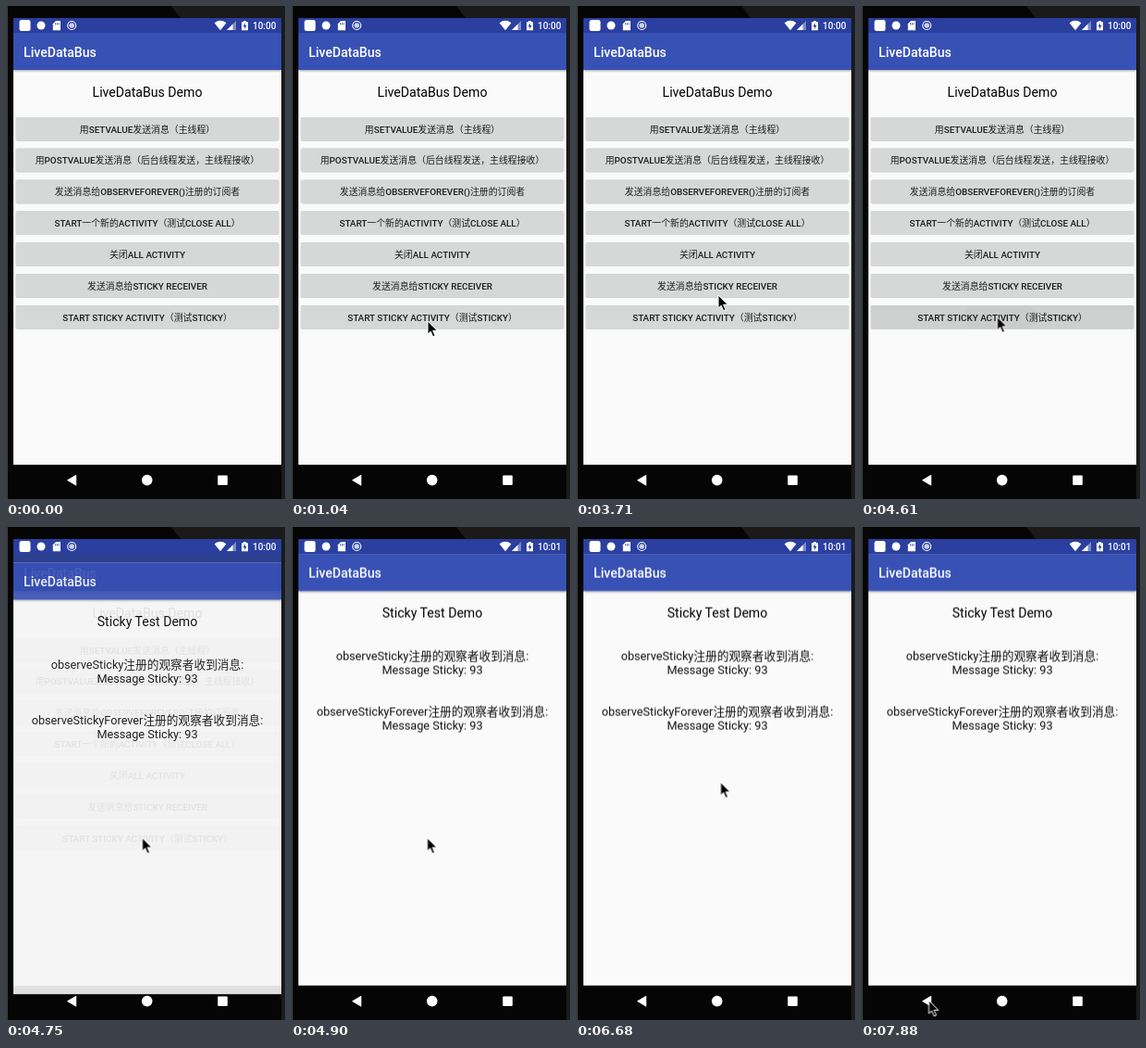
Recreate the animation shown at these times as an HTML page. Size 302 by 532 pixels, loop 8 s.

```html
<!DOCTYPE html>
<html lang="zh-CN">
<head>
<meta charset="utf-8">
<title>LiveDataBus Demo</title>
<style>
html, body { margin: 0; width: 100%; height: 100%; overflow: hidden; background: #050505; }
svg { display: block; width: 302px; height: 532px; }
text { font-family: Roboto, "Noto Sans CJK SC", "Noto Sans CJK", sans-serif; }
.mid { text-anchor: middle; }
.bar { fill: #3851b5; filter: drop-shadow(0 1px 1.2px rgba(0, 0, 0, .35)); }
.title { font-size: 14.1px; font-weight: 500; fill: #fff; }
.head { font-size: 14.1px; }
.msg { font-size: 12.7px; fill: #111; }
.btn rect { fill: #d6d7d7; filter: drop-shadow(0 .8px .7px rgba(0, 0, 0, .32)); }
.btn text { font-size: 9.88px; font-weight: 500; fill: #1c1c1c; }
.clock { font-size: 10px; font-weight: 500; fill: #fff; }

.loop { animation: 8s step-end infinite; }
#home { animation-name: home; }
#sticky { animation-name: sticky; }
#send { animation-name: send; }
#press { animation-name: press; }
#before { animation-name: before; }
#after { animation-name: after; }
#cursor { animation-name: cursor; }

@keyframes home {
  0% { opacity: 1 }
  59.37% { opacity: .8 }
  61.25%, 100% { opacity: 0 }
}
@keyframes sticky {
  0% { opacity: 0; transform: translateY(9.4px) }
  59.37% { opacity: .9; transform: translateY(9.4px) }
  61.25%, 100% { opacity: 1; transform: none }
}
@keyframes send {
  0% { opacity: 0 }
  35.37% { opacity: .6 }
  37.25% { opacity: 1 }
  40.87%, 100% { opacity: 0 }
}
@keyframes press {
  0% { opacity: 0 }
  55.75% { opacity: .5 }
  57.62% { opacity: 1 }
  59.37%, 100% { opacity: 0 }
}
@keyframes before {
  0% { opacity: 1 }
  61.25%, 100% { opacity: 0 }
}
@keyframes after {
  0% { opacity: 0 }
  61.25%, 100% { opacity: 1 }
}
@keyframes cursor {
  0% { opacity: 0; transform: translate(162px, 465px) }
  /* enter from below, overshoot, settle */
  3.75% { opacity: 1; transform: translate(162px, 465px) }
  5.62% { transform: translate(152px, 415px) }
  7.5% { transform: translate(140px, 360px) }
  9.37% { transform: translate(132px, 322px) }
  11.12% { transform: translate(138px, 310px) }
  13% { transform: translate(148px, 340px) }
  14.87% { transform: translate(150px, 380px) }
  16.75% { transform: translate(149.5px, 399px) }
  /* up to the sticky sender */
  22.37% { transform: translate(150px, 380px) }
  24.25% { transform: translate(152px, 345px) }
  26% { transform: translate(155px, 312px) }
  27.87% { transform: translate(156.5px, 301.5px) }
  /* down to the sticky activity */
  46.37% { transform: translate(154px, 312px) }
  48.25% { transform: translate(149px, 329px) }
  50.12% { transform: translate(147.5px, 335.5px) }
  /* swing aside and return */
  74.37% { transform: translate(128px, 368px) }
  76.12% { transform: translate(98px, 398px) }
  78% { transform: translate(112px, 356px) }
  79.87% { transform: translate(138px, 300px) }
  81.62% { transform: translate(154px, 272px) }
  83.5% { transform: translate(156.5px, 275.5px) }
  /* to the back key */
  87.25% { transform: translate(154px, 284px) }
  89.12% { transform: translate(143px, 318px) }
  91% { transform: translate(124px, 372px) }
  92.87% { transform: translate(104px, 432px) }
  94.75% { transform: translate(86px, 482px) }
  96.62% { transform: translate(76px, 505px) }
  98.5%, 100% { opacity: 1; transform: translate(73.5px, 511px) }
}
</style>
</head>
<body>
<svg viewBox="0 0 302 532">
  <!-- device -->
  <rect width="302" height="532" fill="#050505"/>
  <path d="M179 0H302V13H189Z" fill="#1a1a1b"/>
  <rect width="2" height="532" fill="#38393a"/>
  <rect x="298" width="4" height="532" fill="#1b1b1c"/>
  <rect x="8" y="13" width="290" height="482" fill="#000"/>

  <g id="home" class="loop">
    <rect x="8" y="29" width="290" height="466" fill="#fafafa"/>
    <rect class="bar" x="8" y="29" width="290" height="40"/>
    <text class="title" x="19" y="55">LiveDataBus</text>
    <text class="head mid" x="153" y="98">LiveDataBus Demo</text>
    <g id="buttons"></g>
    <ellipse id="send" class="loop" cx="150" cy="306" rx="32" ry="8" fill="#000" fill-opacity=".035"/>
    <g id="press" class="loop" fill="#000" fill-opacity=".035">
      <rect x="10.8" y="323.2" width="284.4" height="25.4" rx="1.4"/>
      <rect x="112" y="323.2" width="78" height="25.4" rx="10" fill-opacity=".02"/>
    </g>
  </g>

  <g id="sticky" class="loop">
    <rect x="8" y="29" width="290" height="466" fill="#fafafa"/>
    <rect class="bar" x="8" y="29" width="290" height="40"/>
    <text class="title" x="19" y="55">LiveDataBus</text>
    <g class="mid">
      <text class="head" x="153" y="98">Sticky Test Demo</text>
      <g class="msg">
        <text x="153" y="143.5">observeSticky注册的观察者收到消息:</text>
        <text x="153" y="158.5">Message Sticky: 93</text>
        <text x="153" y="203.5">observeStickyForever注册的观察者收到消息:</text>
        <text x="153" y="218.5">Message Sticky: 93</text>
      </g>
    </g>
  </g>

  <!-- status bar -->
  <rect x="8" y="13" width="290" height="16" fill="#2a3f9f"/>
  <g fill="#fff">
    <rect x="14.5" y="15" width="12" height="12" rx="2.5"/>
    <circle cx="38" cy="21" r="4.5"/>
    <path d="M54 16H59V26.3H50.8V19.2Z"/>
    <path d="M53.6 18.2V20.4M55.4 18.2V20.4M57.2 18.2V20.4" stroke="#2a3f9f" stroke-width=".8"/>
    <circle cx="71.2" cy="21" r="4.5" fill="none" stroke="#fff" stroke-width="1.1"/>
    <circle cx="71.2" cy="21" r="2.8" opacity=".75"/>
    <path d="M225.6 18.2Q232 13.4 238.4 18.2L232 26.2Z"/>
    <path d="M249 16V26H239Z" opacity=".4"/>
    <path d="M245.5 19.5V26H239Z"/>
    <path d="M257 16H260V17.2H262V26.3H255V17.2H257Z"/>
    <path d="M259 18.3L256.6 22.2H258.2V25L260.5 21H259Z" fill="#2a3f9f"/>
    <g class="clock">
      <text id="before" class="loop" x="267" y="24.6">10:00</text>
      <text id="after" class="loop" x="267" y="24.6">10:01</text>
    </g>
    <!-- navigation keys -->
    <path d="M66.5 511.7L75.8 506.3V517.2Z" stroke="#fff" stroke-width=".8" stroke-linejoin="round"/>
    <circle cx="152.7" cy="511.6" r="5.8"/>
    <rect x="229.2" y="506.4" width="10.6" height="10.6" rx="1"/>
  </g>

  <g id="cursor" class="loop">
    <path d="M0 0V14.2L3.2 11.2L5.6 16.8L8 15.8L5.6 10.3H10.2Z" stroke="#fff" stroke-width="1" stroke-linejoin="round"/>
  </g>
</svg>
<script>
const labels = [
  "用SETVALUE发送消息（主线程）",
  "用POSTVALUE发送消息（后台线程发送，主线程接收）",
  "发送消息给OBSERVEFOREVER()注册的订阅者",
  "START一个新的ACTIVITY（测试CLOSE ALL）",
  "关闭ALL ACTIVITY",
  "发送消息给STICKY RECEIVER",
  "START STICKY ACTIVITY（测试STICKY）"
];
document.getElementById("buttons").innerHTML = labels.map((label, i) => {
  const y = 120 + i * 33.87;
  return `<g class="btn mid">
    <rect x="10.8" y="${y}" width="284.4" height="25.4" rx="1.4"/>
    <text x="153" y="${y + 16.6}">${label}</text>
  </g>`;
}).join("");
</script>
</body>
</html>
```
